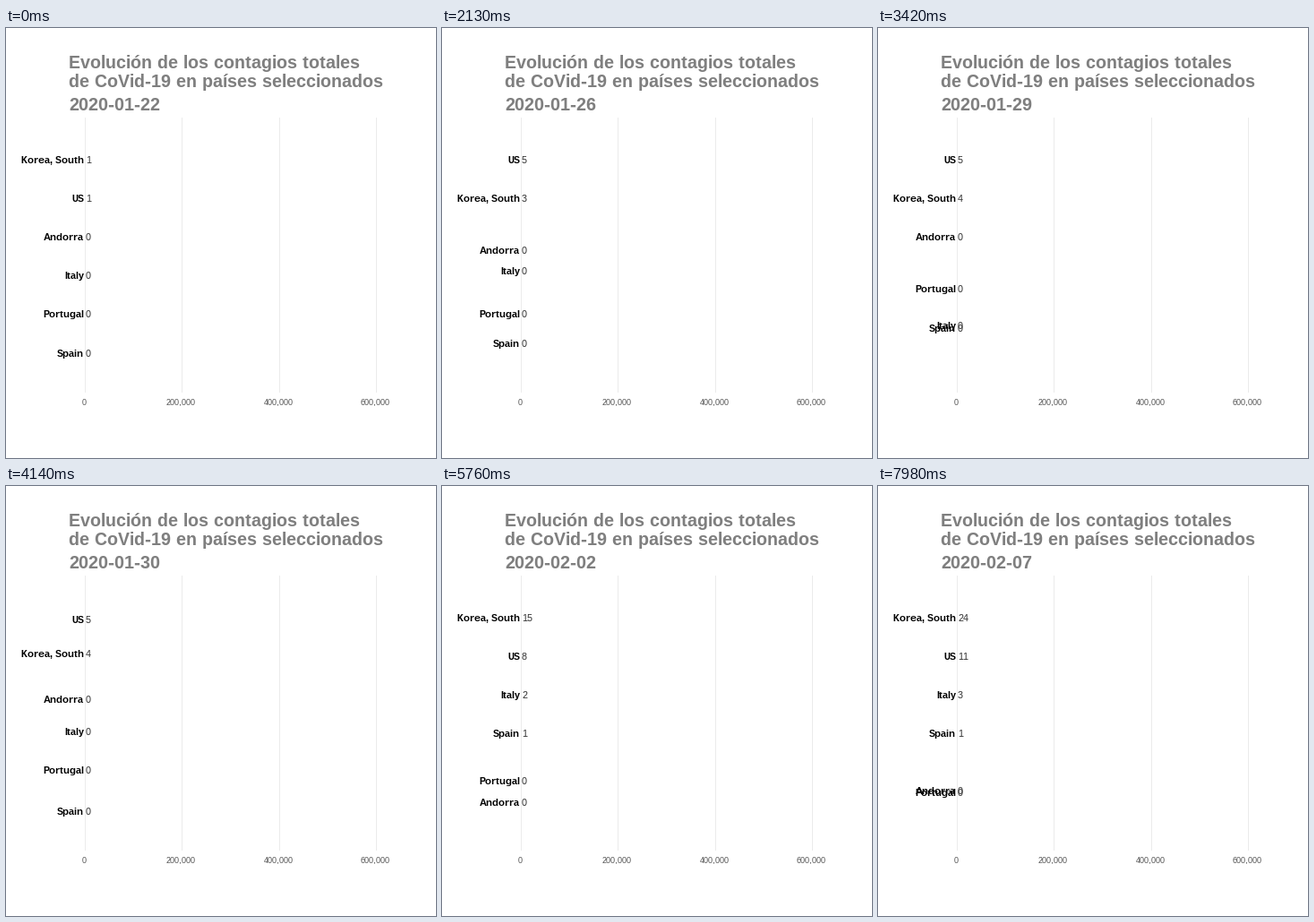
Recreate the animation shown at these times as a matplotlib script. Size 480 px wide and 480 px high, loop 8000 ms.

```python
import numpy as np
import matplotlib.pyplot as plt
from matplotlib.animation import FuncAnimation
from matplotlib.patches import Rectangle

SIZE, DPI = 480, 72          # at 72 dpi one point is one pixel
STEP_MS, INTERVAL, LOOP = 30, 20, 8000

# Whole-pixel glyph widths without kerning
plt.rcParams.update({
    "font.family": "Liberation Sans",
    "text.hinting": "native",
    "text.hinting_factor": 1,
    "text.kerning_factor": 6,
})

NAMES = {"K": "Korea, South", "U": "US", "A": "Andorra",
         "I": "Italy", "P": "Portugal", "S": "Spain"}

# Daily totals and the ranking from top to bottom, one entry per day
TOTALS = {
    "K": [1, 1, 2, 2, 3, 4, 4, 4, 4, 11, 12, 15, 15, 16, 19, 23, 24],
    "U": [1, 1, 2, 2, 5, 5, 5, 5, 5, 7, 8, 8, 11, 11, 11, 11, 11],
    "I": [0] * 9 + [2] * 7 + [3],
    "S": [0] * 10 + [1] * 7,
    "A": [0] * 17,
    "P": [0] * 17,
}
RANKS = ["KUAIPS"] * 3 + [
    "KUIPSA", "UKAIPS", "UKISPA", "UKAIPS", "UKAPSI", "UKAIPS",
    "KUIPAS", "KUISAP", "KUISPA"] + ["KUISAP"] * 3 + ["KUISPA", "KUISAP"]

# Step at which each day is reached: 17 steps a day, with two longer ones
STARTS = [17 * d + (d >= 4) + (d >= 12) for d in range(len(RANKS))]
FIRST_DAY = np.datetime64("2020-01-22")


def row_y(rank):
    return 150.6 + 43.2 * rank


fig = plt.figure(figsize=(SIZE / DPI, SIZE / DPI), dpi=DPI, facecolor="white")
ax = fig.add_axes([0, 0, 1, 1])
ax.set_xlim(0, SIZE)
ax.set_ylim(SIZE, 0)
ax.axis("off")


def label(x, y, text, size, color, ha="left", weight="normal"):
    return ax.text(x, y, text, fontsize=size, color=color, ha=ha,
                   va="baseline", weight=weight)


for x, text in zip((88, 196, 305, 413), ("0", "200,000", "400,000", "600,000")):
    ax.add_patch(Rectangle((x, 100), 1, 307, fc="#ebebeb", lw=0,
                           antialiased=False))
    label(x - 0.5, 421, text, 9, "#4d4d4d", ha="center")

GREY = "#7f7f7f"
label(70, 45, "Evolución de los contagios totales", 20, GREY, weight="bold")
label(70, 66, "de CoVid-19 en países seleccionados", 20, GREY, weight="bold")
date = label(70, 92, "", 20, GREY, weight="bold")

names = {k: label(87, 0, n, 11, "black", ha="right", weight="bold")
         for k, n in NAMES.items()}
counts = {k: label(89, 0, "", 11, "#333333") for k in NAMES}


def update(frame):
    step = int((frame + 0.5) * INTERVAL // STEP_MS)
    day = max(d for d, s in enumerate(STARTS[:-1]) if s <= step)
    part = (step - STARTS[day]) / (STARTS[day + 1] - STARTS[day])
    shown = day + (part >= 0.5)

    date.set_text(str(FIRST_DAY + int(shown)))
    for k in NAMES:
        a, b = RANKS[day].index(k), RANKS[day + 1].index(k)
        y = row_y(a + (b - a) * part)
        names[k].set_y(y)
        counts[k].set_y(y)
        counts[k].set_text(str(TOTALS[k][shown]))
    return [date, *names.values(), *counts.values()]


anim = FuncAnimation(fig, update, frames=LOOP // INTERVAL, interval=INTERVAL,
                     init_func=lambda: update(0), repeat=True, repeat_delay=0)
plt.show()
```
